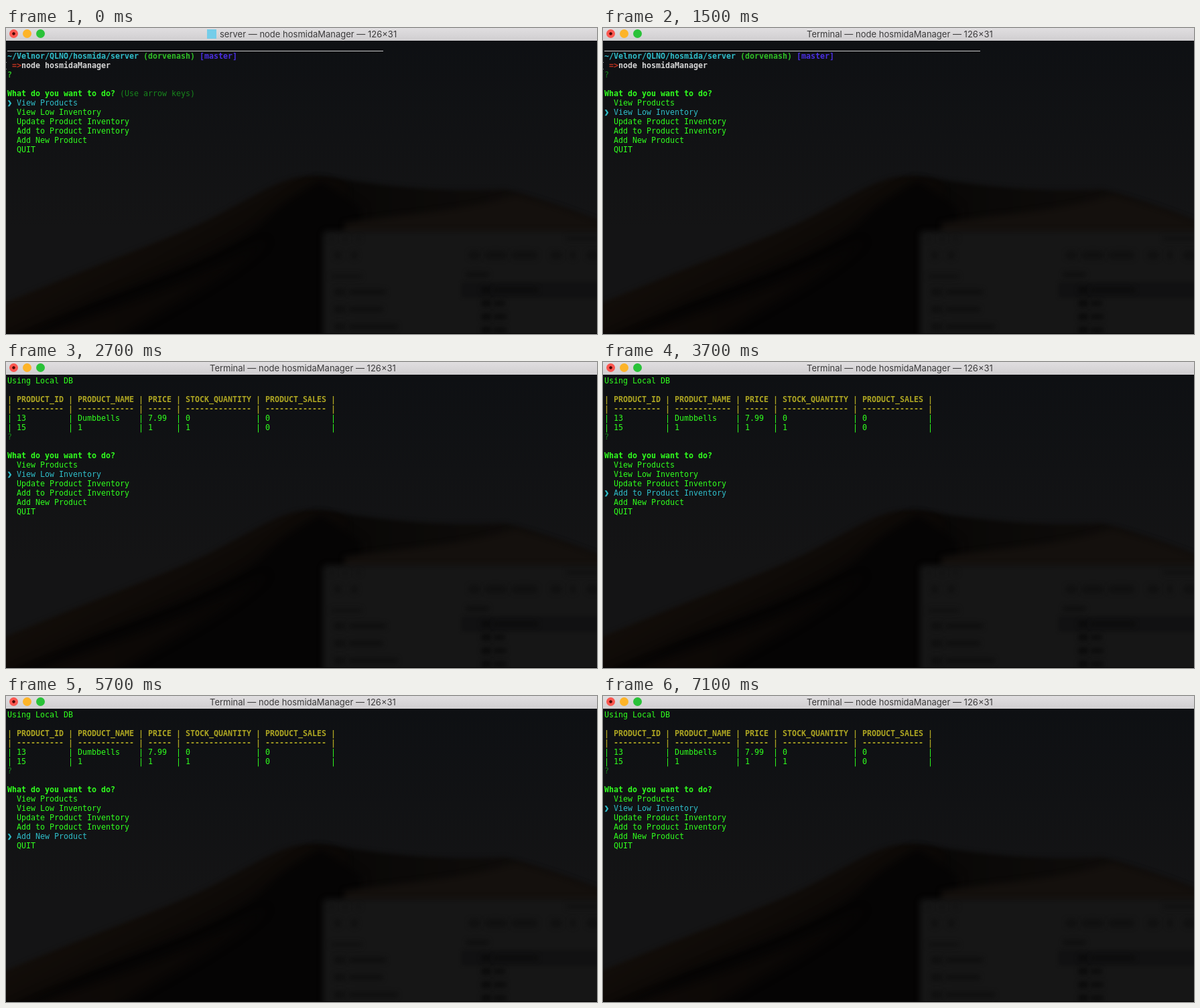
Write an HTML page with a canvas that moves like this. It is 882 px wide and 458 px high and loops after 7.2 s.

```html
<!DOCTYPE html>
<html lang="en">
<head>
<meta charset="utf-8">
<title>Inventory manager</title>
<style>
html, body { margin: 0; width: 100%; height: 100%; overflow: hidden; background: #0f1013; }
#stage { position: relative; width: 882px; height: 458px; overflow: hidden; }
canvas { position: absolute; left: 0; top: 0; }
#bar {
  position: absolute; left: 0; top: 0; width: 882px; height: 19px;
  background: linear-gradient(#e0dee0, #d0ced0);
}
#bar i { position: absolute; top: 1.5px; width: 13px; height: 13px; border-radius: 50%; }
#bar i.close { left: 4.5px; background: radial-gradient(circle, #4a0502 1.8px, #fb5750 2.6px); }
#bar i.min { left: 24.5px; background: #fdb428; }
#bar i.zoom { left: 44.5px; background: #29c238; }
#icon { position: absolute; left: 300px; top: 2px; width: 14px; height: 14px; background: #75cde9; }
#title {
  position: absolute; top: 0; white-space: pre;
  font: 13px/18px Inter, sans-serif; color: #3b3a3b;
}
#screen {
  position: absolute; left: 2px; top: 21px;
  font: 11.63px/14px "DejaVu Sans Mono", monospace; color: #30ff1e;
}
.row { height: 14px; white-space: pre; }
.mark { display: inline-block; width: 2ch; height: 14px; vertical-align: top; -webkit-text-stroke: .6px; }
.rule { position: absolute; left: 0; top: 13px; width: 561px; height: 1px; background: #c9c9c9; }
.edge { position: absolute; left: -6px; color: #a9a9a9; }
b { font-weight: bold; }
.cyan { color: #2fbdc9; }
.user { color: #2fbf26; }
.branch { color: #4a2fe0; }
.arrow { color: #bd321f; }
.white { color: #d6d6d6; }
.head { color: #aea622; }
.dim { color: #17851c; }
</style>
</head>
<body>
<div id="stage">
  <canvas id="desk" width="882" height="458"></canvas>
  <div id="screen"></div>
  <div id="bar"><i class="close"></i><i class="min"></i><i class="zoom"></i><span id="icon"></span><span id="title"></span></div>
</div>
<script>
const LOOP = 7200;
const APP = 'hosmidaManager';
const OPTIONS = ['View Products', 'View Low Inventory', 'Update Product Inventory',
  'Add to Product Inventory', 'Add New Product', 'QUIT'];

// start time, selected option, table shown, hint shown, folder title shown
const STEPS = [
  [0, 0, 0, 1, 1],
  [300, 0, 0, 1, 0],
  [900, 1, 0, 0, 0],
  [1600, 0, 1, 1, 0],
  [2600, 1, 1, 0, 0],
  [3000, 2, 1, 0, 0],
  [3400, 3, 1, 0, 0],
  [4300, 4, 1, 0, 0],
  [5200, 5, 1, 0, 0],
  [5600, 4, 1, 0, 0],
  [5800, 3, 1, 0, 0],
  [6000, 2, 1, 0, 0],
  [6200, 1, 1, 0, 0]
];

const $ = id => document.getElementById(id);
const span = (cls, text) => `<span class="${cls}">${text}</span>`;
const bold = (cls, text) => `<b class="${cls}">${text}</b>`;

const WIDTHS = [10, 12, 5, 14, 13];
const cells = list => '| ' + list.map((s, i) => s.padEnd(WIDTHS[i])).join(' | ') + ' |';

const promptRows = first => [
  '<span class="rule"></span>',
  bold('cyan', '~/Velnor/QLNO/hosmida/server') + ' ' + bold('user', '(dorvenash)') + ' ' + bold('branch', '[master]'),
  span('edge', '[') + ' ' + bold('arrow', '=&gt;') + bold('white', 'node ' + APP),
  first ? bold('user', '?') : span('dim', '?')
];

const tableRows = () => [
  'Using Local DB',
  '',
  bold('head', cells(['PRODUCT_ID', 'PRODUCT_NAME', 'PRICE', 'STOCK_QUANTITY', 'PRODUCT_SALES'])),
  bold('head', cells(WIDTHS.map(n => '-'.repeat(n)))),
  cells(['13', 'Dumbbells', '7.99', '0', '0']),
  cells(['15', '1', '1', '1', '0']),
  span('dim', '?')
];

const menuRows = (selected, hint) => [
  '',
  '<b>What do you want to do?</b>' + (hint ? ' ' + span('dim', '(Use arrow keys)') : ''),
  ...OPTIONS.map((name, i) => {
    const on = i === selected;
    const row = span('mark', on ? '❯' : '') + name;
    return on ? span('cyan', row) : row;
  })
];

function show([, selected, table, hint, folder]) {
  const rows = [...(table ? tableRows() : promptRows(hint)), ...menuRows(selected, hint)];
  $('screen').innerHTML = rows.map(r => `<div class="row">${r}</div>`).join('');
  $('icon').style.display = folder ? '' : 'none';
  $('title').style.left = (folder ? 319 : 304) + 'px';
  $('title').textContent = `${folder ? 'server' : 'Terminal'} — node ${APP} — 126×31`;
}

function paintDesk() {
  const c = $('desk').getContext('2d');
  const shape = (color, blur, draw) => {
    c.filter = `blur(${blur}px)`;
    c.fillStyle = color;
    c.beginPath();
    draw();
    c.fill();
  };
  const pill = (x, y, w, h, color = '#101010') =>
    shape(color, 3, () => c.roundRect(x, y - h / 2, w, h, h / 2));
  const fade = (x0, y0, x1, y1, from, to) => {
    const g = c.createLinearGradient(x0, y0, x1, y1);
    g.addColorStop(0, from);
    g.addColorStop(1, to);
    return g;
  };

  c.fillStyle = fade(0, 19, 0, 300, '#0e1013', '#141415');
  c.fillRect(0, 0, 882, 458);

  // far ridge
  shape(fade(450, 0, 882, 0, '#080706', '#110e0c'), 3, () => {
    c.moveTo(400, 250);
    c.quadraticCurveTo(440, 217, 490, 225);
    c.bezierCurveTo(580, 238, 650, 246, 745, 241);
    c.quadraticCurveTo(820, 262, 900, 294);
    c.lineTo(900, 480);
    c.lineTo(300, 480);
  });
  // near dune: lit crest, falling off into shade
  shape(fade(210, 300, 290, 445, '#120d09', '#050404'), 3, () => {
    c.moveTo(-20, 420);
    c.bezierCurveTo(110, 362, 215, 328, 300, 288);
    c.bezierCurveTo(380, 248, 410, 222, 455, 222);
    c.quadraticCurveTo(485, 222, 510, 232);
    c.lineTo(530, 480);
    c.lineTo(-20, 480);
  });
  shape('#050404', 7, () => {
    c.moveTo(470, 228);
    c.bezierCurveTo(430, 250, 405, 268, 385, 290);
    c.bezierCurveTo(340, 330, 250, 365, 130, 410);
    c.lineTo(0, 470);
    c.lineTo(530, 480);
    c.lineTo(530, 270);
  });
  // low lit fold
  shape(fade(30, 0, 400, 0, '#0f0a07', '#080605'), 7, () => {
    c.moveTo(20, 470);
    c.bezierCurveTo(150, 420, 270, 385, 390, 318);
    c.bezierCurveTo(320, 385, 230, 420, 150, 475);
  });
  shape('#14100d', 4, () => {
    c.moveTo(505, 292);
    c.bezierCurveTo(590, 278, 680, 276, 760, 250);
    c.quadraticCurveTo(830, 268, 900, 298);
    c.lineTo(900, 310);
    c.lineTo(505, 310);
  });

  // window behind the terminal
  shape('#161616', 4, () => c.roundRect(473, 304, 440, 180, 6));
  [482, 502, 522].forEach(x => pill(x, 315, 8, 7, '#131313'));
  [[490, 10], [515, 10], [690, 18], [714, 34], [754, 40], [812, 18], [842, 8], [866, 20]]
    .forEach(([x, w]) => pill(x, 340, w, 13, '#111111'));
  pill(835, 315, 50, 8, '#121212');
  pill(484, 372, 48, 8, '#121212');
  [[395, 57], [421, 52], [447, 74]].forEach(([y, w]) => {
    pill(489, y, 18, 12);
    pill(511, y, w, 9);
  });
  pill(686, 369, 35, 9);
  shape('#111112', 2, () => c.rect(680, 381, 210, 22));
  [[392, 68], [412, 18], [432, 20], [452, 20]].forEach(([y, w]) => {
    pill(709, y, 15, 11, '#0b0b0b');
    pill(727, y, w, 9, '#0d0d0d');
  });

  c.filter = 'none';
  c.fillStyle = '#050505';
  c.fillRect(0, 457, 882, 1);
}

paintDesk();
const start = performance.now();
let current = null;

function tick() {
  const t = (performance.now() - start) % LOOP;
  const step = STEPS.findLast(s => s[0] <= t) || STEPS[0];
  if (step !== current) show(current = step);
  requestAnimationFrame(tick);
}
tick();
</script>
</body>
</html>
```
